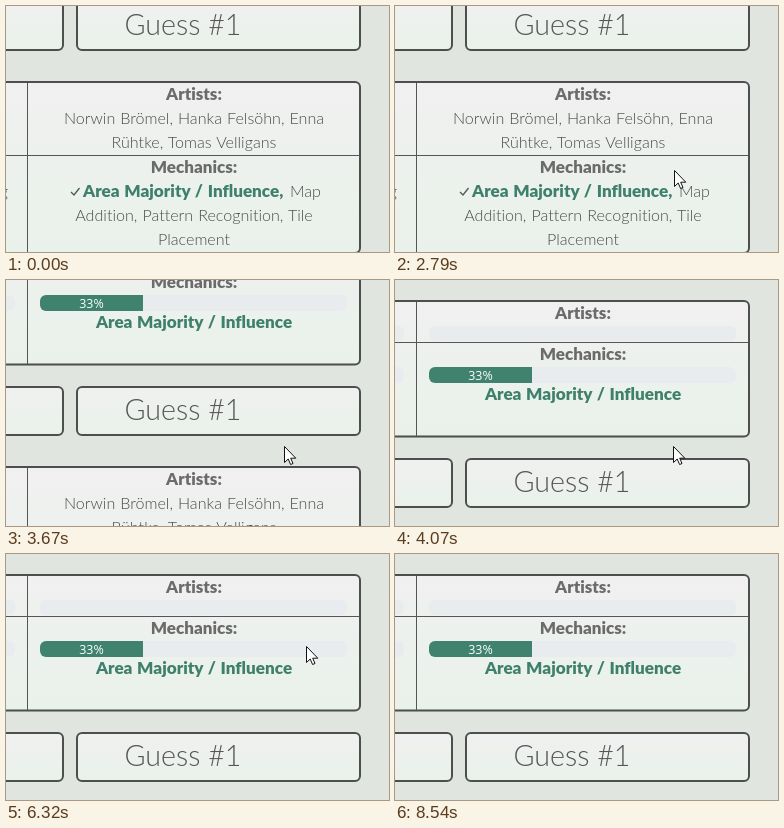
An HTML page for the animation above (9.2 s loop, 383 by 246 pixels).

```html
<!DOCTYPE html>
<html lang="en">
<head>
<meta charset="utf-8">
<title>Guess board</title>
<style>
  html, body { margin: 0; width: 100%; height: 100%; overflow: hidden; background: #e0e5e0; }
  svg { display: block; width: 383px; height: 246px; }
  text { font-family: Lato, "Open Sans", sans-serif; font-size: 16.1px; font-weight: 300; font-variant-ligatures: none; fill: #4a4a4a; word-spacing: .7px; text-anchor: middle; }
  .head { font-size: 17px; font-weight: 900; fill: #6b6b6b; }
  .hit { font-size: 17.1px; font-weight: 900; fill: #3f806c; }
  .title { font-size: 28.7px; fill: #565656; word-spacing: 0; }
  .percent { font: 400 12.5px "Open Sans", sans-serif; fill: #fff; }
  .card { fill: url(#paper); stroke: #4d4f4e; stroke-width: 2; }
  .rule { fill: none; stroke: #555; stroke-width: 1; }
  .track { fill: #e8ecee; }
</style>
</head>
<body>
<svg viewBox="0 0 383 246">
  <defs>
    <linearGradient id="paper" x1="0" y1="0" x2="0" y2="1">
      <stop offset="0" stop-color="#f0f0f0"/>
      <stop offset="1" stop-color="#e9f2ea"/>
    </linearGradient>
  </defs>
  <rect width="383" height="246" fill="#e0e5e0"/>
  <g id="page"></g>
  <g id="cursor">
    <path id="arrow" d="M.5 .5V16.5L4.2 13 6.6 18.5 9 17.5 6.7 12.2H11.8Z" fill="#fff" stroke="#111" stroke-linejoin="round"/>
    <g id="beam" fill="none">
      <path d="M-3.5-7.5H3.5M0-7.5V7.5M-3.5 7.5H3.5" stroke="#fff" stroke-width="2.4" opacity=".6"/>
      <path d="M-3.5-7.5H-1L0-6.5 1-7.5H3.5M0-7V7M-3.5 7.5H-1L0 6.5 1 7.5H3.5" stroke="#111"/>
    </g>
  </g>
</svg>
<script>
const LOOP = 9200, LINE = 24, CENTER = 188;
const $ = id => document.getElementById(id);
const page = $("page");

function add(tag, attrs, content = "") {
  const node = document.createElementNS("http://www.w3.org/2000/svg", tag);
  for (const key in attrs) node.setAttribute(key, attrs[key]);
  node.textContent = content;
  return page.appendChild(node);
}
const card = (x, right, y, bottom) =>
  add("rect", { class: "card", x, y, width: right - x, height: bottom - y, rx: 5 });
const rule = d => add("path", { class: "rule", d });
const texts = [];
const label = (content, y, kind = "", x = CENTER, anchor = "middle") =>
  texts.push(add("text", { x, y, class: kind, style: `text-anchor:${anchor}` }, content));
const lines = (contents, y) =>
  contents.forEach((content, i) => label(content, y + i * LINE));
const tracks = (y, height) => [34, -298].forEach(x =>
  add("rect", { class: "track", x, y, width: 307, height, rx: 6 }));

// Summary table
card(-60, 354, -162, -26.5);
rule("M21.5-161V-27M-60-120.5H353");
tracks(-137, 15);
tracks(-96, 16);
add("path", { d: "M137-96H40a6 6 0 0 0-6 6v4a6 6 0 0 0 6 6h97z", fill: "#3f826d" });
label("33%", -83.5, "percent", 85.5);
label("Artists:", -144, "head");
label("Mechanics:", -103, "head");
label("Area Majority / Influence", -63, "hit");

// Guess heading
card(-60, 57, -4, 44);
card(71, 354, -4, 44);
label("Guess #1", 28.5, "title", 177);

// Guess table
card(-60, 354, 76, 247);
rule("M21.5 77V246M-60 149.5H353");
label("Artists:", 94, "head");
lines(["Norwin Brömel, Hanka Felsöhn, Enna", "Rühtke, Tomas Velligans"], 118);
label("Mechanics:", 167, "head");
add("path", { d: "M65 186l3 3 5.5-7", fill: "none", stroke: "#4f5a55", "stroke-width": 1.3 });
label("Area Majority / Influence,", 191, "hit", 77, "start");
label("Map", 191, "", 315, "end");
lines(["Addition, Pattern Recognition, Tile", "Placement"], 215);
label("g", 191, "", 2, "end");

// Pointer visits: a few points passed at equal intervals
const visits = [
  { from: 340, to: 2860, path: [[315, 240], [245, 192], [155, 168], [92, 188], [203, 210], [281, 152], [278, 166]] },
  { from: 4070, to: 8540, path: [[278, 166], [225, 96], [114, 92], [220, 142], [300, 92], [172, 74], [90, 125], [213, 194], [312, 246]] }
];

const clamp = (v, low, high) => Math.min(high, Math.max(low, v));
const hold = (t, base, step) => base + Math.floor((t - base) / step) * step;

// Catmull-Rom curve, u from 0 to 1 over the whole path
function along(path, u) {
  const last = path.length - 1;
  const place = clamp(u, 0, 1) * last;
  const i = Math.min(Math.floor(place), last - 1), f = place - i;
  return [0, 1].map(axis => {
    const [a, b, c, d] = [-1, 0, 1, 2].map(k => path[clamp(i + k, 0, last)][axis]);
    return b + f / 2 * (c - a + f * (2 * a - 5 * b + 4 * c - d + f * (3 * (b - c) + d - a)));
  });
}

// Slow start, then a quick glide to the summary
function scrollAt(t) {
  const u = clamp((hold(t, 3400, 67.5) - 3060) / 820, 0, 1);
  const rise = u ** 2.13;
  return Math.round(183 * rise / (rise + 6.28 * (1 - u) ** 2.13));
}

function overText(x, y) {
  const pad = 3;
  return texts.some(node => {
    const box = node.getBBox();
    return x > box.x - pad && x < box.x + box.width + pad &&
           y > box.y && y < box.y + box.height + pad;
  });
}

function draw(t) {
  const shift = scrollAt(t);
  page.setAttribute("transform", `translate(0 ${shift})`);
  const visible = t >= visits[0].from && t < visits[1].to;
  $("cursor").style.display = visible ? "" : "none";
  if (!visible) return;
  const { from, to, path } = visits[t < visits[1].from ? 0 : 1];
  const [x, y] = along(path, (hold(t, from, 70) - from) / (to - from)).map(Math.round);
  const beam = overText(x, y - shift);
  $("beam").style.display = beam ? "" : "none";
  $("arrow").style.display = beam ? "none" : "";
  $("cursor").setAttribute("transform", `translate(${beam ? x + .5 : x} ${y})`);
}

const start = performance.now();
function tick() {
  draw((performance.now() - start) % LOOP);
  requestAnimationFrame(tick);
}
tick();
</script>
</body>
</html>
```
